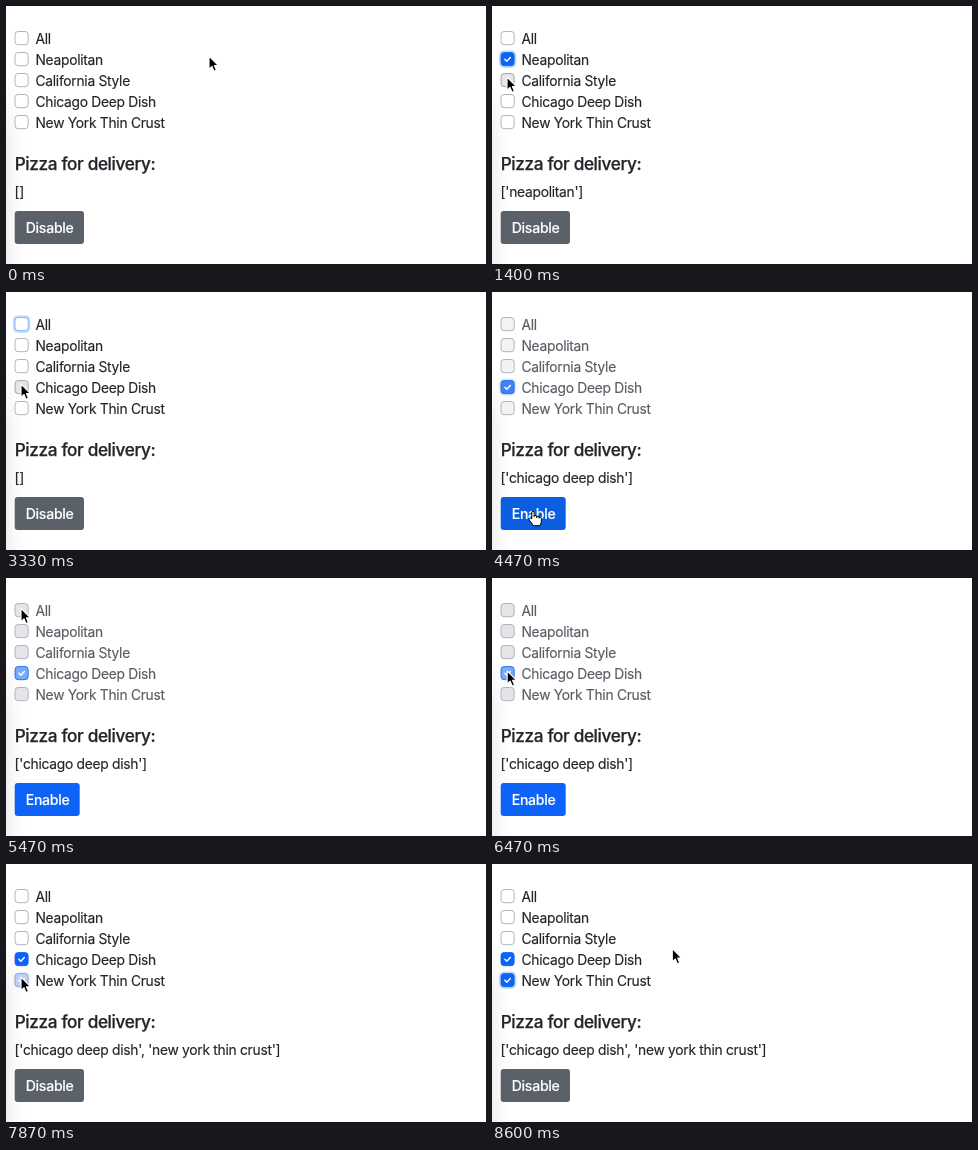
An HTML page for the animation above (8990 ms loop, 480 by 258 pixels).

```html
<!DOCTYPE html>
<html lang="en">
<head>
<meta charset="utf-8">
<title>Pizza for delivery</title>
<style>
  html, body { margin: 0; height: 100%; overflow: hidden; background: #fff; }
  svg { display: block; width: 100%; height: 100%; }
  text { font: 13.8px Inter, Roboto, sans-serif; letter-spacing: -.02em; fill: #212529; stroke: #212529; stroke-width: .15; white-space: pre; }
  #title { font-size: 17.15px; font-weight: 500; stroke-width: .25; }
  #caption { font-size: 14.1px; font-weight: 500; fill: #fff; stroke: #fff; }
</style>
</head>
<body>
<svg viewBox="0 0 480 258">
  <defs>
    <linearGradient id="across"><stop stop-color="#000" stop-opacity=".06"/><stop offset=".45" stop-color="#000" stop-opacity=".02"/><stop offset="1" stop-color="#000" stop-opacity="0"/></linearGradient>
    <linearGradient id="down" x2="0" y2="1"><stop stop-color="#fff"/><stop offset="1" stop-color="#fff" stop-opacity="0"/></linearGradient>
  </defs>
  <rect y="75" width="20" height="183" fill="url(#across)"/>
  <rect y="75" width="20" height="60" fill="url(#down)"/>
  <g id="rows"></g>
  <text id="title" x="8.7" y="163.8">Pizza for delivery:</text>
  <text id="list" x="8.6" y="190.8"></text>
  <rect id="button" x="8.7" y="205" height="33" rx="3"/>
  <text id="caption" x="19.7" y="226.9"></text>
  <path id="arrow" d="M0 0V13.2L3 10.4L5 15.2L7.4 14.2L5.4 9.5H9.4Z" stroke="#fff" stroke-width="1.1" stroke-linejoin="round"/>
  <path id="hand" d="M-1.2 8V1.5Q0-.5 1.2 1.5V6V5Q3.4 4 3.7 6V7V5.6Q5.7 4.8 6.2 6.6V7.6V6.5Q8 6 8.5 8Q8.6 12 7 15H.5Q-1 12.5-4 9.2Q-4.4 7-2.5 7.5Z" fill="#fff" stroke="#000" stroke-linejoin="round"/>
</svg>
<script>
const LOOP = 8990, FADE = 150, PRESS = 110, TRAVEL = 300, BUTTON = 9;
const names = ['All', 'Neapolitan', 'California Style', 'Chicago Deep Dish', 'New York Thin Crust'];
// [time, row]; the button sits where a tenth row would be
const clicks = [[1050, 1], [1460, 2], [1990, 0], [3000, 0], [3400, 3], [4400, BUTTON], [7440, BUTTON], [7830, 4]];
// rows the pointer visits without clicking
const wander = [[380, 1], [680, 5.5], [1680, -1], [2200, -1], [3740, BUTTON], [5180, 0], [5720, 1], [6100, 2], [6350, 3], [6710, BUTTON]];

const $ = id => document.getElementById(id);
const clamp = v => Math.min(1, Math.max(0, v));
const ramp = dt => clamp(dt / FADE);
const smooth = u => u * u * (3 - 2 * u);

const stops = [
  [0, 203, 50],
  ...[...wander, ...clicks.map(([time, row]) => [time - PRESS, row])]
    .sort((a, b) => a[0] - b[0])
    .map(([time, row]) => [time, row === BUTTON ? 41 : 15, 28.8 + 21.1 * row]),
  [8530, 180.3, 84.6]
];

$('rows').innerHTML = names.map((name, i) => {
  const y = 25.5 + 21 * i;
  const box = `x="9" y="${y}" width="13.2" height="13.2" rx="3.2"`;
  return `<g>
    <rect x="6.9" y="${y - 2.1}" width="17.4" height="17.4" rx="5" fill="#bfdafe"/>
    <rect ${box}/>
    <g><rect ${box} fill="#0d63f5"/>
      <path d="M12.9 ${y + 6.8}l1.9 1.9l3.5-3.7" fill="none" stroke="#fff" stroke-width="1.5" stroke-linecap="round" stroke-linejoin="round"/></g>
    <rect ${box} fill="#000"/>
    <text x="29.5" y="${y + 12}">${name}</text></g>`;
}).join('');
const rows = [...$('rows').children].map(row => row.children);

function pointer(t) {
  let [left, x, y] = stops[0];
  for (const [time, toX, toY] of stops.slice(1)) {
    const from = Math.max(left + PRESS, time - TRAVEL);
    const u = smooth(clamp((t - from) / (time - from)));
    x += (toX - x) * u;
    y += (toY - y) * u;
    left = time;
  }
  return [x, y];
}

function draw(t) {
  const level = names.map(() => 0), focus = names.map(() => 0);
  let checked = names.map(() => 0), disabled = false, dim = 0, pressed = -1;

  clicks.forEach(([time, row], k) => {
    const next = clicks[k + 1]?.[0] ?? Infinity;
    focus[row] += ramp(t - time) - ramp(t - next);
    if (t >= time - PRESS && t < time) pressed = row;
    if (t < time) return;
    if (row === BUTTON) {
      disabled = !disabled;
      dim += (disabled ? 1 : -1) * ramp(t - time);
      return;
    }
    const after = checked.map((v, i) => row === 0 ? 1 - checked[0] : i === row ? 1 - v : v);
    after.forEach((v, i) => level[i] += (v - checked[i]) * ramp(t - time));
    checked = after;
  });

  rows.forEach(([ring, box, tick, shade, label], i) => {
    const gray = dim * (1 - level[i]);
    ring.style.opacity = focus[i];
    box.style.fill = `rgb(${255 - 27 * gray},${255 - 26 * gray},${255 - 22 * gray})`;
    box.style.stroke = level[i] > .5 ? '#3b7ff0' : focus[i] > .5 ? '#86b7fe' : '#b0b4ba';
    tick.style.opacity = level[i] * (1 - .45 * dim);
    shade.style.opacity = pressed === i ? .1 : 0;
    label.style.fill = label.style.stroke = disabled ? '#585d64' : '#212529';
  });

  const picked = names.filter((_, i) => i && checked[i]).map(n => `'${n.toLowerCase()}'`);
  $('list').textContent = `[${picked.join(', ')}]`;

  const [x, y] = pointer(t), width = disabled ? 65 : 69.3;
  const over = x > 9 && x < 9 + width && y > 205 && y < 238;
  $('button').setAttribute('width', width);
  $('button').style.fill = !disabled ? '#5a6169' : over ? '#0b5ee0' : '#0d63f8';
  $('caption').textContent = disabled ? 'Enable' : 'Disable';
  for (const id of ['arrow', 'hand']) {
    $(id).setAttribute('transform', `translate(${x} ${y})`);
    $(id).style.display = over === (id === 'hand') ? '' : 'none';
  }
}

const start = performance.now();
function tick() {
  draw((performance.now() - start) % LOOP);
  requestAnimationFrame(tick);
}
tick();
</script>
</body>
</html>
```
